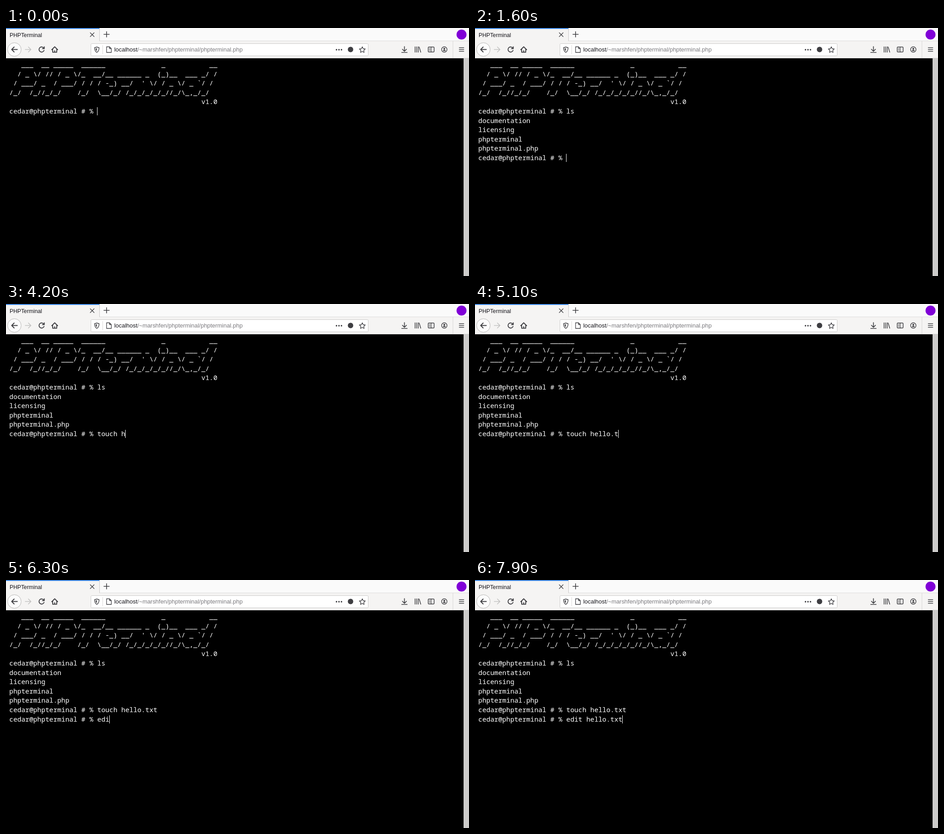
Write an HTML page that moves like this. It is 1022 px wide and 548 px high and loops after 8 s.

```html
<!DOCTYPE html>
<html lang="en">
<head>
<meta charset="utf-8">
<title>PHPTerminal</title>
<style>
  html, body { margin: 0; width: 100%; height: 100%; overflow: hidden; background: #000; }
  svg { display: block; }
  text { white-space: pre; }
  .ui { font-family: "Liberation Sans", Arial, sans-serif; }
  #screen { font: 14.72px "Noto Sans Mono", monospace; fill: #fff; }
  .icon { fill: none; stroke: #3e3e42; stroke-width: 1.7; stroke-linecap: round; stroke-linejoin: round; }
</style>
</head>
<body>
<svg width="1022" height="548" viewBox="0 0 1022 548">
  <!-- tab strip -->
  <rect width="1022" height="30" fill="#fafafa"/>
  <rect y="29" width="1022" height="38" fill="#f5f4f3"/>
  <path d="M206 28.5H1022" stroke="#dddcdb"/>
  <rect width="206" height="30" fill="#f5f4f3"/>
  <rect width="206" height="2" fill="#3584e4"/>
  <path d="M206.5 0V29" stroke="#c9c8c7"/>
  <text class="ui" x="8" y="19.5" font-size="12.27" fill="#15141a">PHPTerminal</text>
  <circle cx="1005.5" cy="14.5" r="11" fill="#8000d7"/>

  <!-- toolbar -->
  <path d="M0 66.5H1022" stroke="#d5d4d3"/>
  <circle cx="18.5" cy="47.5" r="15" fill="#fcfcfc" stroke="#b4b3b2"/>
  <rect x="187.5" y="34.5" width="612" height="27" rx="2" fill="#fff" stroke="#cbcac9"/>
  <path d="M213.5 38V58M986.5 29V66" stroke="#d8d7d6"/>
  <text class="ui" x="239" y="52" font-size="12.93" fill="#15141a">localhost<tspan fill="#7a797d">/~marshfen/phpterminal/phpterminal.php</tspan></text>
  <g class="icon">
    <path d="M186 10.5L194.500 19M194.500 10.5L186 19" stroke-width="1.4"/>
    <path d="M216 14H228M222 8V20" stroke-width="1.6"/>
    <path d="M12.500 47.5H25M18 42L12.500 47.5L18 53" stroke-width="1.9"/>
    <path d="M42.500 47.5H55M49.500 42L55 47.5L49.500 53" stroke="#c3c2c1"/>
    <path d="M83.500 44.500A5.700 5.700 0 1 0 84 49.500M84.500 41.500V45.500H80.500" stroke-width="1.9"/>
    <path d="M101 48L107.500 41.500L114 48M103 47.500V53.500H112V47.500M107.500 53V50" stroke-width="1.9"/>
    <path d="M200.500 42L205.500 43.500C205.500 49 204 52 200.500 54C197 52 195.500 49 195.500 43.500Z" stroke-width="1.4"/>
    <path d="M200.500 44.500V51.500C198.700 50 198 48.500 197.800 45.300Z" fill="#3e3e42" stroke="none"/>
    <path d="M222 41.500H228.500L232.500 45.500V54H222ZM228.500 41.500V45.500H232.500" stroke-width="1.3"/>
    <path d="M786.500 41.500L788.500 45.700L793 46.300L789.700 49.500L790.500 54L786.500 51.800L782.500 54L783.300 49.500L780 46.300L784.500 45.700Z" stroke-width="1.4"/>
    <path d="M879.500 41V51M875 47L879.500 51.500L884 47M873.500 54H885.500"/>
    <path d="M903 41.500V53.500M906.500 41.500V53.500M910 41.500V53.500M912 42L915.500 53.500" stroke-width="1.5"/>
    <rect x="932" y="42" width="13" height="11" rx="1.5" stroke-width="1.5"/>
    <path d="M938.500 42V53M934.500 45H936.500M934.500 47.500H936.500M934.500 50H936.500" stroke-width="1.2"/>
    <circle cx="967.500" cy="47.500" r="6" stroke-width="1.4"/>
    <path d="M964 51A3.600 3.200 0 0 1 971 51Z" fill="#3e3e42" stroke="none"/>
    <path d="M1000.500 43.500H1010.500M1000.500 47.500H1010.500M1000.500 51.500H1010.500" stroke-width="1.6"/>
  </g>
  <g fill="#3e3e42">
    <circle cx="967.500" cy="46" r="2.100"/>
    <circle cx="729.500" cy="48" r="1.700"/><circle cx="735" cy="48" r="1.700"/><circle cx="740.500" cy="48" r="1.700"/>
    <circle cx="760.500" cy="47.500" r="6"/>
  </g>

  <!-- page -->
  <rect y="67" width="1022" height="481"/>
  <rect x="1010" y="67" width="12" height="481" fill="#cdcccb"/>
  <g id="screen"></g>
  <rect id="cursor" width="1" height="18" fill="#fff"/>
</svg>
<script>
const LOOP = 8000, LEFT = 7.3, BASELINE = 86, LINE = 20.6, CELL = 8.832;
const PROMPT = 'cedar@phpterminal # % ';
const BANNER = String.raw`   ___  __ _____  ______              _           __
  / _ \/ // / _ \/_  __/__ ______ _  (_)__  ___ _/ /
 / ___/ _  / ___/ / / / -_) __/  ' \/ / _ \/ _ ${'`'}/ /
/_/  /_//_/_/    /_/  \__/_/ /_/_/_/_/_//_/\_,_/_/
                                                v1.0`.split('\n');

// Each key time types one more character of the command.
const commands = [
  { text: 'ls', keys: [1200, 1300], enter: 1600,
    output: ['documentation', 'licensing', 'phpterminal', 'phpterminal.php'] },
  { text: 'touch hello.txt', enter: 5600, output: [],
    keys: [2900, 3100, 3200, 3300, 3900, 4000, 4200, 4300, 4400, 4600, 4700, 4900, 5100, 5200, 5400] },
  { text: 'edit hello.txt', enter: Infinity, output: [],
    keys: [5800, 6100, 6300, 6400, 6500, 6600, 6700, 6800, 7000, 7100, 7400, 7500, 7700, 7900] },
];
const cursorHidden = [[900, 1200], [2100, 2900]];

const screen = document.getElementById('screen');
const cursor = document.getElementById('cursor');
const rows = Array.from({ length: 12 }, (_, i) => {
  const row = document.createElementNS('http://www.w3.org/2000/svg', 'text');
  row.setAttribute('x', LEFT);
  row.setAttribute('y', BASELINE + i * LINE);
  return screen.appendChild(row);
});

function linesAt(time) {
  const lines = [...BANNER];
  for (const { text, keys, enter, output } of commands) {
    lines.push(PROMPT + text.slice(0, keys.filter(key => key <= time).length));
    if (time < enter) break;
    lines.push(...output);
  }
  return lines;
}

function draw(now) {
  const time = now % LOOP;
  const lines = linesAt(time);
  rows.forEach((row, i) => {
    const line = lines[i] || '';
    if (row.textContent !== line) row.textContent = line;
  });
  const last = lines.length - 1;
  const hidden = cursorHidden.some(([from, to]) => time >= from && time < to);
  cursor.setAttribute('x', Math.round(LEFT + lines[last].length * CELL - 0.2));
  cursor.setAttribute('y', Math.round(72 + last * LINE));
  cursor.setAttribute('visibility', hidden ? 'hidden' : 'visible');
  requestAnimationFrame(draw);
}
requestAnimationFrame(draw);
</script>
</body>
</html>
```
